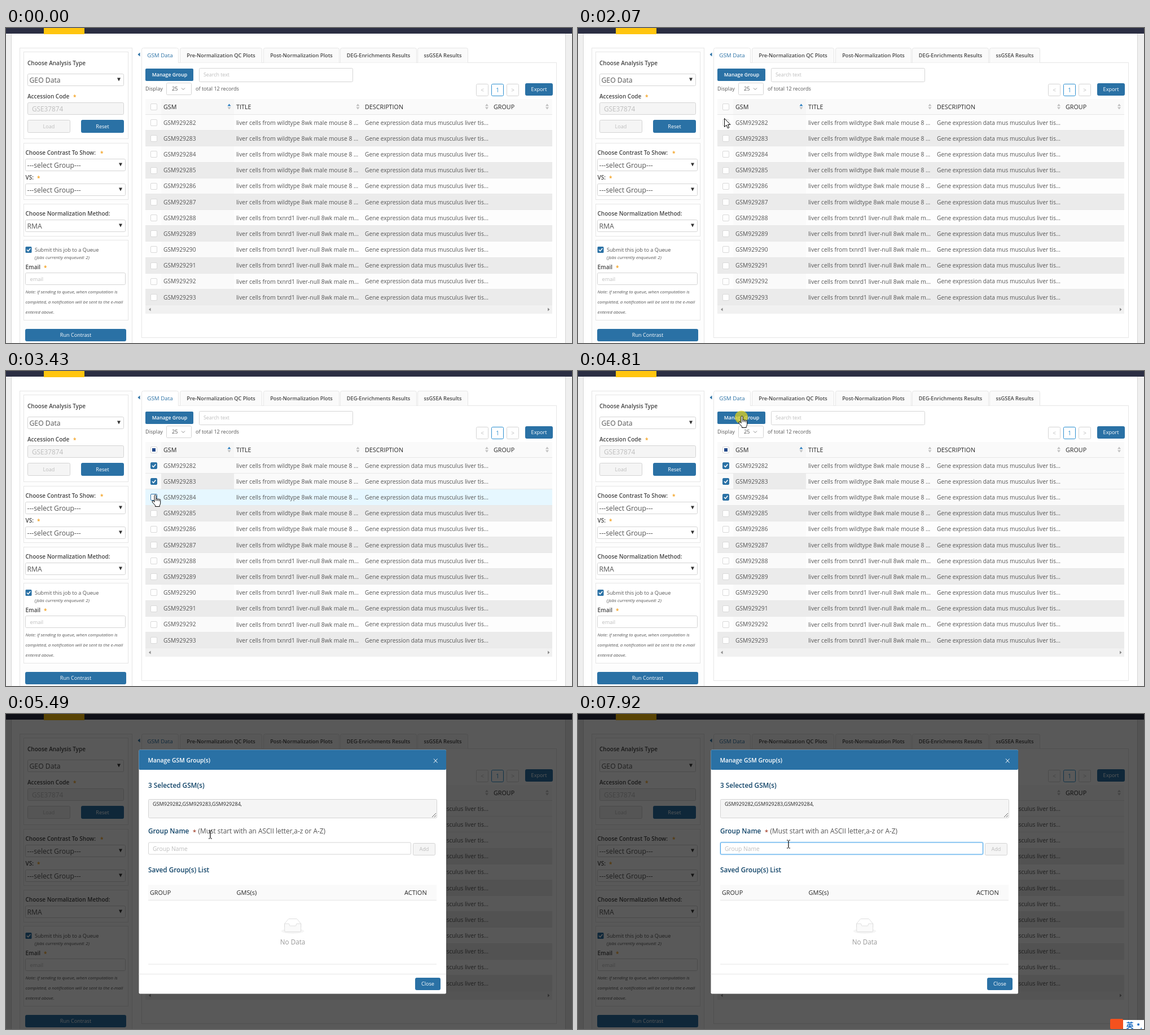
An HTML page for the animation above (8 s loop, 1003x559 px).

```html
<!DOCTYPE html>
<html lang="en">
<head>
<meta charset="utf-8">
<title>GSM group manager</title>
<style>
html, body { margin: 0; width: 100%; height: 100%; overflow: hidden; background: #f0f0f0; }
svg { display: block; width: 100%; height: 100%; font-family: "Open Sans", "Noto Sans CJK SC", "Noto Sans CJK", sans-serif; }
</style>
</head>
<body>
<svg id="stage" viewBox="0 0 1003 559"></svg>
<script>
const LOOP = 8000;
const BLUE = '#2a71a5', LINE = '#e6e6e6', BORDER = '#d4d4d4', TEXT = '#555', DARK = '#262626', PALE = '#bdbdbd';
const BOLD = 'font-weight="600"', MID = 'text-anchor="middle"', ITALIC = 'font-style="italic"';

// y is the middle of the capital letters
const text = (s, x, y, size, fill = TEXT, extra = '') =>
  `<text x="${x}" y="${y + size * 0.36}" font-size="${size}" fill="${fill}" ${extra}>${s}</text>`;
const rect = (x1, y1, x2, y2, fill, stroke = 'none', r = 0) =>
  `<rect x="${x1}" y="${y1}" width="${x2 - x1}" height="${y2 - y1}" rx="${r}" fill="${fill}" stroke="${stroke}"/>`;
const path = (d, fill = 'none', stroke = 'none', width = 1) =>
  `<path d="${d}" fill="${fill}" stroke="${stroke}" stroke-width="${width}"/>`;
const group = (body, attrs) => `<g ${attrs}>${body}</g>`;
const button = (s, x1, y1, x2, y2, enabled = true) =>
  rect(x1 + .5, y1 + .5, x2 - .5, y2 - .5, enabled ? BLUE : '#f5f5f5', enabled ? BLUE : BORDER, 2) +
  text(s, (x1 + x2) / 2, (y1 + y2) / 2, 9.1, enabled ? '#fff' : PALE, MID);
const label = (s, x, y, starX) =>
  text(s, x, y, 10, '#444', BOLD) + (starX ? text('*', starX, y + 1, 10, '#f39c12', BOLD) : '');
const select = (s, x1, y1, x2) =>
  rect(x1, y1, x2, y1 + 21, '#fff', BORDER, 2) + text(s, x1 + 3, y1 + 11, 12.2, '#555') +
  path(`M${x2 - 11.5} ${y1 + 7}h6l-3 6z`, '#333');

function checkbox(y, state, focus) {
  const checked = state === 'on';
  return rect(256.5, y - 5.5, 267.5, y + 5.5, checked ? BLUE : '#fff', checked || focus ? BLUE : '#d9d9d9', 1.5) +
    (checked ? path(`M259 ${y}l2.3 2.4 4-4.8`, 'none', '#fff', 1.6) : '') +
    (state === 'some' ? rect(259, y - 3, 265, y + 3, '#24498a') : '');
}

function sidebar() {
  const boxes = [[42, 196], [204, 304], [312, 369], [376, 518]]
    .map(([a, b]) => rect(31.5, a + .5, 216.5, b + .5, '#fff', LINE)).join('');
  const notes = ['Note: if sending to queue, when computation is',
    'completed, a notification will be sent to the e-mail', 'entered above.']
    .map((s, i) => text(s, 34.5, 468 + i * 18.2, 7.9, TEXT, ITALIC)).join('');
  return rect(24.5, 35.5, 223.5, 580, '#fdfdfd', LINE) + boxes +
    label('Choose Analysis Type', 38, 62.5) + select('GEO Data', 38.5, 81.5, 208.5) +
    label('Accession Code', 38, 121, 119) +
    rect(38.5, 132.5, 208.5, 153.5, '#f5f5f5', BORDER, 2) + text('GSE37874', 46, 143.5, 11.8, PALE) +
    button('Load', 38, 163, 114, 186, false) + button('Reset', 133, 163, 209, 186) +
    label('Choose Contrast To Show:', 34.5, 221, 167) + select('---select Group---', 34.5, 232.5, 211.5) +
    label('VS:', 34.5, 265, 55) + select('---select Group---', 34.5, 276.5, 211.5) +
    label('Choose Normalization Method:', 34.5, 329) + select('RMA', 34.5, 340.5, 211.5) +
    rect(34.5, 388, 45.5, 399, BLUE, 'none', 1.5) + path('M37 393.5l2.3 2.4 4-4.8', 'none', '#fff', 1.6) +
    text('Submit this job to a Queue', 51, 394, 9.14) +
    text('(Jobs currently enqueued: 2)', 50.5, 407, 7.9, TEXT, ITALIC) +
    label('Email', 34.5, 424, 67) +
    rect(34.5, 434.5, 211.5, 455.5, '#fff', BORDER, 2) + text('email', 42.5, 445.5, 9.2, PALE) +
    notes + button('Run Contrast', 34, 534, 213, 556);
}

function tabs() {
  const list = [['GSM Data', 240, 306], ['Pre-Normalization QC Plots', 308, 454], ['Post-Normalization Plots', 456, 591],
    ['DEG-Enrichments Results', 592, 728], ['ssGSEA Results', 729, 819]];
  return rect(240.5, 61.5, 975.5, 549.5, '#fff', LINE) + list.map(([s, a, b], i) =>
    path(`M${a + .5} 61.5V38.5q0-3 3-3H${b - 3.5}q3 0 3 3V61.5`, i ? '#fafafa' : '#fff', LINE) +
    (i ? '' : rect(a + 1, 60, b - 1, 63, '#fff')) +
    text(s, (a + b) / 2, 48.5, i ? 9.25 : 9.8, i ? '#444' : BLUE, MID + (i ? ' ' + BOLD : ''))).join('') +
    path('M237.5 43.5v7l-4-3.5z', BLUE);
}

function toolbar() {
  const pages = [['&lt;', 833], ['1', 860], ['&gt;', 887]].map(([s, x]) => {
    const current = s === '1';
    return rect(x + .5, 99.5, x + 21.5, 120.5, '#fff', current ? '#2b8fd0' : BORDER, 2) +
      text(s, x + 11, 110, 10, current ? '#2b8fd0' : PALE, MID);
  }).join('');
  return rect(247, 72, 332, 94, BLUE, 'none', 2) + text('Manage Group', 290, 83, 8.8, '#fff', MID + ' ' + BOLD) +
    rect(342.5, 71.5, 614.5, 95.5, '#fff', BORDER, 2) + text('Search text', 350, 83, 8.9, PALE) +
    text('Display', 247, 107.5, 9.1) + rect(284.5, 97.5, 328.5, 118.5, '#fff', BORDER, 2) +
    text('25', 294, 108, 9.4) + path('M311 106.5l3 3 3-3', 'none', '#888') +
    text('of total 12 records', 336, 107.5, 9.05) + pages + button('Export', 920, 98, 969, 120);
}

function table({ checked, hover, focus }) {
  const step = 28.18;
  let out = rect(247, 126, 968, 153.5, '#fafafa') + rect(275, 126, 404, 153.5, '#f6f6f6') +
    rect(247, 153, 968, 154, LINE) + checkbox(140, checked ? 'some' : '');
  [['GSM', 279, 395.5], ['TITLE', 408, 623.5], ['DESCRIPTION', 636, 852], ['GROUP', 864, 959]].forEach(([s, x, sortX], i) => {
    out += text(s, x, 140, 10.75, DARK) + path(`M${sortX - 3} 138.5h6l-3-4z`, i ? '#bfbfbf' : '#2b7fc0') +
      path(`M${sortX - 3} 140.5h6l-3 4z`, '#bfbfbf');
  });
  for (let i = 0; i < 12; i++) {
    const y = 168 + i * step, top = Math.round(y - 14), bottom = Math.round(y + 14.18);
    const stripe = i % 2 ? '#ebebeb' : '#fdfdfd', selected = i < checked && hover !== 0 || i < checked - 1;
    const fill = i === hover ? '#e6f7ff' : selected ? '#fafafa' : stripe;
    const sorted = i === hover ? fill : i % 2 ? '#ebebeb' : '#fafafa';
    out += rect(247, top, 968, bottom, fill) + rect(275, top, 404, bottom, sorted) +
      rect(247, bottom - 1, 968, bottom, '#e8e8e8') + checkbox(Math.round(y), i < checked ? 'on' : '', i === focus) +
      text('GSM' + (929282 + i), 279, y, 10.25) +
      text(i < 6 ? 'liver cells from wildtype 8wk male mouse 8 ...' : 'liver cells from txnrd1 liver-null 8wk male m...', 408, y, 10.3) +
      text('Gene expression data mus musculus liver tis...', 636, y, 10.2);
  }
  return out + rect(247, 492, 968, 507, '#f1f1f1') +
    path('M256.5 496.5v6l-3.5-3z', '#8a8a8a') + path('M960 496.5v6l3.5-3z', '#8a8a8a');
}

function modal({ focused, caret }) {
  const heading = (s, y) => text(s, 252, y, 11.75, '#114468', BOLD);
  const emptyIcon = group(
    '<ellipse cx="32" cy="33" rx="32" ry="7" fill="#f5f5f5"/>' +
    path('M55 13L45 1.5Q44 0 42.5 0h-21Q20 0 19 1.5L9 13v9h46z', '#fff', '#d9d9d9', 1.3) +
    path('M41.6 16q0-3 2.3-3H55v18q0 4-3 4H12q-3 0-3-4V13h11q2.4 0 2.4 3t2.2 3h14.8q2.2 0 2.2-3z', '#fafafa', '#d9d9d9', 1.3),
    'transform="translate(488 363.5) scale(.63 .66)"');
  return rect(235.5, 63.5, 780, 496.5, '#fff', 'none', 2) + rect(235.5, 63.5, 780, 99, BLUE, 'none', 2) +
    text('Manage GSM Group(s)', 251.5, 82, 10.35, '#fff', BOLD) +
    path('M758 79.5l6.5 7M764.5 79.5l-6.5 7', 'none', '#fff', 1) +
    heading('3 Selected GSM(s)', 127) +
    rect(252.5, 151.5, 763.5, 184.5, '#f5f5f5', BORDER, 2) +
    text('GSM929282,GSM929283,GSM929284,', 260, 160, 9.05, '#262626') +
    path('M755 183l7-7M759 183l3-3', 'none', '#666') +
    heading('Group Name', 208) + text('*', 331, 209, 11, '#a3402a', BOLD) +
    text('(Must start with an ASCII letter,a-z or A-Z)', 340.5, 208, 11.83) +
    (focused === 2 ? rect(251, 226.5, 719, 250.5, '#d3eafb', 'none', 3) : '') +
    rect(252.5, 228, 717.5, 249, '#fff', focused ? '#40a0e8' : BORDER, 2) +
    text('Group Name', 260, 239, 10.3, PALE) + (caret ? rect(260, 231, 261, 245, '#222') : '') +
    button('Add', 721, 229, 761, 251, false) +
    heading('Saved Group(s) List', 277) +
    rect(252, 303, 763, 331, '#fafafa') + rect(252, 330, 763, 331, LINE) +
    text('GROUP', 255, 317, 10.75, DARK) + text('GMS(s)', 408.5, 317, 11, DARK) + text('ACTION', 706, 317, 11, DARK) +
    emptyIcon + text('No Data', 508, 405, 11.7, '#999', MID) +
    rect(252, 443.5, 763, 444.5, LINE) + rect(235.5, 461, 780, 462, LINE) + button('Close', 725, 468, 770, 490);
}

const inputMethod = () => rect(966, 543, 1003, 559, '#fff') + rect(943, 541, 966, 559, '#f4511e', 'none', 2) +
  text('英', 971.5, 552.5, 13, '#1f6fc4', BOLD) + '<circle cx="993" cy="551" r="2" fill="#1f6fc4"/>' +
  text(',', 996.5, 553, 13, '#1f6fc4', BOLD);

const pointers = {
  arrow: path('M.5.5V15.5L4 12.3 6.4 17.8 8.8 16.8 6.5 11.4H11z', '#fff', '#000'),
  hand: path('M4.5 13V2a1.5 1.5 0 0 1 3 0V8a1.4 1.4 0 0 1 2.7.3a1.4 1.4 0 0 1 2.6.7a1.2 1.2 0 0 1 2.4.8V15q0 2-1.5 4V21H6V19L1 13.5Q-.2 11 1.5 10.5Q3 10.3 4.5 13ZM7.5 8v3M10.2 8.5v2.5M12.8 9.5v2', '#fff', '#000'),
  beam: path('M-3-7H-.8M.8-7H3M0-6.5V6.5M-3 7H-.8M.8 7H3', 'none', '#000', 1.2),
  blocked: '<circle r="6.5" fill="#fff" stroke="#000" stroke-width="2"/>' + path('M-4.5-4.5L4.5 4.5', 'none', '#000', 2)
};

// Each entry changes part of the state at its time.
const timeline = [
  [0, { checked: 0, hover: -1, focus: -1, pointer: null }],
  [1370, { pointer: ['blocked', 89.5, 167.5] }],
  [1730, { pointer: ['arrow', 216, 127] }],
  [2070, { pointer: ['arrow', 259, 160] }],
  [2400, { pointer: ['hand', 257.5, 173.5], hover: 0, focus: 0 }],
  [2740, { pointer: ['hand', 257.5, 201.5], checked: 1, focus: 1 }],
  [3100, { checked: 2, click: true }],
  [3430, { pointer: ['hand', 258.5, 219.5], hover: 2, focus: 2, click: false }],
  [3780, { pointer: ['hand', 262.5, 166.5], checked: 3 }],
  [4130, { pointer: ['hand', 289.5, 71.5], hover: -1, focus: -1 }],
  [4460, { pointer: ['hand', 284.5, 79.5] }],
  [4810, { click: true }],
  [5160, { pointer: ['arrow', 289, 85.5], click: false, dim: .27, scale: .89, opacity: .9 }],
  [5490, { pointer: ['beam', 362, 214], dim: .65, scale: 1, opacity: 1 }],
  [5840, { pointer: ['beam', 373, 231], focused: 1 }],
  [6170, { ime: true }],
  [6520, { focused: 2, caret: true }],
  [6870, { caret: false }],
  [7230, { caret: true }],
  [7920, { caret: false }]
];

function scene(s) {
  let out = rect(0, 0, 1003, 559, '#efefef') + rect(9.5, -1, 991.5, 570, '#fff', '#d6d6d6') +
    rect(0, 0, 1003, 10, '#2b2e43') + rect(67, 0, 139, 11, '#ffc50f') +
    sidebar() + tabs() + toolbar() + table(s);
  if (s.dim) {
    const left = s.scale < 1 ? 241 : 235, top = s.scale < 1 ? 65 : 63;
    out += rect(0, 0, 1003, 559, `rgba(0,0,0,${s.dim})`) +
      group(modal(s), `opacity="${s.opacity}" transform="translate(${left} ${top}) scale(${s.scale}) translate(-235 -63)"`);
  }
  if (s.ime) out += inputMethod();
  if (s.pointer) {
    const [kind, x, y] = s.pointer;
    if (s.click) out += `<circle cx="${x + 5}" cy="${y + 2.5}" r="11.5" fill="#dccf20" opacity=".75"/>`;
    out += group(pointers[kind], `transform="translate(${x} ${y})"`);
  }
  return out;
}

const stage = document.getElementById('stage');
let shown = 0;
function frame(now) {
  const past = timeline.filter(([start]) => start <= now % LOOP);
  if (past.length !== shown) {
    shown = past.length;
    stage.innerHTML = scene(Object.assign({}, ...past.map(([, change]) => change)));
  }
  requestAnimationFrame(frame);
}
frame(0);
</script>
</body>
</html>
```
